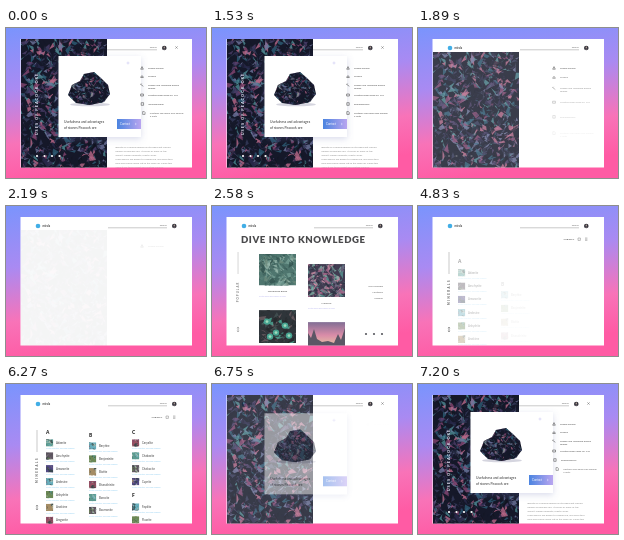
An HTML page that plays this animation: 200x150 px, repeating every 7.23 s.

```html
<!DOCTYPE html>
<html lang="en">
<head>
<meta charset="utf-8">
<title>Mineral library</title>
<style>
  html, body { margin: 0; width: 100%; height: 100%; overflow: hidden; }
  #stage { display: block; width: 100%; height: 100%; font-family: Lato, sans-serif; }
</style>
</head>
<body>
<svg id="stage" viewBox="0 0 200 150">
  <defs>
    <linearGradient id="backdrop" x1="0" y1="0" x2=".2" y2="1">
      <stop offset="0" stop-color="#7a94fd"/>
      <stop offset=".4" stop-color="#a98af2"/>
      <stop offset=".75" stop-color="#f873b8"/>
      <stop offset="1" stop-color="#ff5ba4"/>
    </linearGradient>
    <linearGradient id="action">
      <stop offset="0" stop-color="#4b84e0"/>
      <stop offset="1" stop-color="#b9a5f0"/>
    </linearGradient>
    <linearGradient id="sky" x1="0" y1="0" x2="0" y2="1">
      <stop offset="0" stop-color="#604878"/>
      <stop offset=".5" stop-color="#cf6d91"/>
      <stop offset="1" stop-color="#e3c38a"/>
    </linearGradient>
    <clipPath id="page"><rect x="14.5" y="11" width="171.5" height="128.5"/></clipPath>
    <clipPath id="rock"><path d="M62 67L66 57 74 53 78 46 88 44 96 51 102 57 104 66 98 74 84 77 70 75Z"/></clipPath>
    <filter id="soft" x="-20%" y="-20%" width="140%" height="140%">
      <feDropShadow dx="0" dy="2" stdDeviation="3" flood-color="#6673b0" flood-opacity=".25"/>
    </filter>
  </defs>
  <rect width="200" height="150" fill="url(#backdrop)"/>
  <rect x="14.5" y="11" width="171.5" height="128.5" fill="#fff"/>
  <g id="parts" clip-path="url(#page)"></g>
</svg>
<script>
const LOOP = 7230;
const parts = [];
const root = document.getElementById('parts');

const seg = (t, a, b) => Math.min(1, Math.max(0, (t - a) / (b - a)));
const inOut = p => p * p * (3 - 2 * p);
const out = p => 1 - (1 - p) ** 3;
const show = (t, a, b, c, d) => inOut(seg(t, a, b)) * (1 - inOut(seg(t, c, d)));

// pose(t) gives opacity o and offsets x, y
function part(markup, pose) {
  const node = document.createElementNS('http://www.w3.org/2000/svg', 'g');
  node.innerHTML = markup;
  root.append(node);
  parts.push({ node, pose });
  return node;
}

const text = (x, y, size, str, fill = '#555', extra = '') =>
  `<text x="${x}" y="${y}" font-size="${size}" fill="${fill}" ${extra}>${str}</text>`;
const dot = (x, y, r, fill) => `<circle cx="${x}" cy="${y}" r="${r}" fill="${fill}"/>`;
const line = (x1, y1, x2, y2, color = '#888', width = .5) =>
  `<path d="M${x1} ${y1}L${x2} ${y2}" stroke="${color}" stroke-width="${width}"/>`;
const upright = (x, y, size, str, fill, gap) =>
  text(0, 0, size, str, fill,
    `transform="translate(${x} ${y}) rotate(-90)" text-anchor="middle" font-weight="700" letter-spacing="${gap}"`);

function random(seed) {
  return () => (seed = (seed * 16807) % 2147483647) / 2147483647;
}

function shards(x, y, w, h, colors, count, size, seed) {
  const rnd = random(seed * 7919 + 13);
  const off = () => ((rnd() - .5) * 2 * size).toFixed(1);
  let s = `<rect x="${x}" y="${y}" width="${w}" height="${h}" fill="${colors[0]}"/>`;
  for (let i = 0; i < count; i++) {
    const px = (x + rnd() * w).toFixed(1), py = (y + rnd() * h).toFixed(1);
    const color = colors[Math.floor(rnd() * colors.length)];
    s += `<path d="M${px} ${py}l${off()} ${off()} ${off()} ${off()} ${off()} ${off()}z" fill="${color}" opacity=".8"/>`;
  }
  return s;
}

const photo = (x, y, w, h, ...look) =>
  `<svg x="${x}" y="${y}" width="${w}" height="${h}" overflow="hidden">${shards(0, 0, w, h, ...look)}</svg>`;

const ORE = ['#151829', '#11131f', '#29284a', '#1c2036', '#4a3d68', '#83446f', '#2c5c75',
  '#4b8991', '#353a5a', '#b96889', '#15182a', '#6d739c'];
const FERN = ['#4f766f', '#759e94', '#33534f', '#98b7ac', '#40655f', '#6c8a7c'];
const OPAL = ['#403b50', '#a9688c', '#569391', '#2b3241', '#d08ea6', '#6d6681', '#7fb0a5'];
const REEF = ['#22282d', '#15191d', '#3a4648', '#42a28f', '#66545a', '#1f2428'];

// Header
part(dot(32, 20, 2.3, '#42aee6') + text(36.5, 21, 2.8, 'mirala', '#444', 'font-weight="700"'), () => ({}));
const aside = t => inOut(seg(t, 6350, 6750)) * (1 - inOut(seg(t, 8760, 9060)));
part(line(102, 21.8, 161, 21.8, '#777', .4) +
  text(161, 20.4, 2.5, 'Search', '#666', 'text-anchor="end"') + dot(168.3, 20, 2.3, '#35343c') +
  dot(168.3, 19.3, .8, '#b9a49b') + '<path d="M166.8 21.6q1.5-2 3 0z" fill="#8b8187"/>',
  t => ({ x: -10 * aside(t) }));
part(line(169.3, 18.3, 171.7, 20.7, '#666') + line(171.7, 18.3, 169.3, 20.7, '#666'), t => ({ o: aside(t) }));

// Gallery
part(text(29, 36.8, 9.6, 'DIVE INTO KNOWLEDGE', '#4a4a4c', 'font-weight="900" letter-spacing=".6"'),
  t => ({ o: show(t, 2280, 2540, 4400, 4780), x: -8 * (1 - out(seg(t, 2280, 2640))) }));

const cards = [
  [47, 48, 31, 'Tourquoise green', photo(47, 48, 37, 31.5, FERN, 190, 5, 3)],
  [96, 58, 33, 'Minerals', photo(96, 58, 37, 33, OPAL, 230, 4, 8)],
  [47, 103.5, 33, '', photo(47, 103.5, 37, 33, REEF, 120, 5, 5) +
    [[55, 115], [64, 126], [73, 119], [77, 129], [58, 130]].map(([x, y]) =>
      dot(x, y, 3.2, '#3b9e8a') + dot(x, y, 1.4, '#9ad8b7')).join('')],
  [96, 114, 26, '', '<rect x="96" y="114" width="37" height="26" fill="url(#sky)"/>' +
    '<path d="M96 140V125l3 5 3-9 3 10 5 3 6-1 6 2 4-9 3 6 4-12v20z" fill="#30293c"/>']
];
const leaving = [0, 2, 1, 3];
cards.forEach(([x, y, h, name, picture], i) => {
  const caption = name && text(x + 18.5, y + h + 6.8, 2.6, name, '#444', 'text-anchor="middle"') +
    text(x, y + h + 12.4, 1.8, 'Crystal forms and colours of rocks', '#b6b3ee');
  part(picture + caption, t => {
    const p = out(seg(t, 2280 + 60 * i, 2580 + 60 * i));
    const start = 4180 + 100 * leaving[i];
    return { o: p * (1 - inOut(seg(t, start, start + 320))), y: 10 * (1 - p) };
  });
});

const links = (names, y) => names.map((name, i) =>
  text(171, y + i * 6.3, 2.5, name, '#444', 'text-anchor="end"')).join('');
part(links(['Topics', 'ABC books', 'Minerals'], 55.8) + line(167, 74.5, 171, 74.5, '#999', .3),
  t => ({ o: show(t, 2600, 2940, 4400, 4780), y: -4 * (1 - out(seg(t, 2600, 2940))) }));
part(links(['Encyclopedia', 'Locations', 'Popular'], 83.7),
  t => ({ o: show(t, 2330, 2660, 4400, 4780), y: -8 * (1 - out(seg(t, 2450, 2940))) }));
part([154, 162, 170].map(x => dot(x, 128, 1.1, '#55565c')).join(''),
  t => ({ o: show(t, 2330, 2600, 4400, 4780) }));

// Left rail, shared by gallery and index
const railX = t => -22 * (1 - out(seg(t, 2350, 2940)));
part(line(31, 46, 31, 68, '#777', .4) + line(31, 121, 31, 126, '#666', .7) +
  '<path d="M29.8 122.2L31 121l1.2 1.2M29.8 124.8L31 126l1.2-1.2" fill="none" stroke="#666" stroke-width=".4"/>',
  t => ({ o: show(t, 2330, 2700, 6270, 6600), x: railX(t) }));
part(upright(32, 86, 2.8, 'POPULAR', '#555', 1.1),
  t => ({ o: show(t, 2330, 2700, 4400, 4620), x: railX(t) }));
part(upright(32, 86, 2.8, 'MINERALS', '#555', 1.5), t => ({ o: show(t, 4560, 4780, 6270, 6600) }));

// Index
part(text(145.5, 34, 2.6, 'SUBJECT', '#444') +
  '<path d="M160 32h2.4v2.4H160zM167 32h2.4M167 33.2h2.4M167 34.4h2.4" fill="none" stroke="#666" stroke-width=".4"/>',
  t => ({ o: show(t, 4480, 4780, 6270, 6570) }));

const columns = [
  [40, [['A', 49.6, 59, ['Adamite', 'Aeschynite', 'Amazonite', 'Andesine', 'Anhydrite', 'Analcime', 'Aragonite']]]],
  [83, [['B', 52.8, 62, ['Barytine', 'Benjaminite', 'Biotite', 'Bismuthinite', 'Boracite', 'Bournonite']]]],
  [126, [['C', 49.6, 59, ['Caryalite', 'Chabazite', 'Chalcocite', 'Cuprite']],
    ['F', 113, 123, ['Fayalite', 'Fluorite']]]]
];
const TINTS = ['#5d9b90', '#615762', '#524984', '#67aebc', '#6c8855', '#a58d65', '#965063'];
columns.forEach(([x, groups], c) => {
  let row = 0;
  const pose = r => t => {
    const start = 4700 + 100 * c + 3 * r;
    const p = seg(t, start, start + 330);
    return { o: p * (1 - inOut(seg(t, 6270, 6570))), y: 36 * (1 - p) ** 3 };
  };
  groups.forEach(([letter, base, top, names]) => {
    part(text(x, base, 4.8, letter, '#333', 'font-weight="900"'), pose(row));
    names.forEach((name, i) => {
      const y = top + i * 12.9, n = c * 3 + row;
      part(photo(x, y - 3.7, 7.3, 7.3, [TINTS[n % 7], '#344747', TINTS[(n + 3) % 7], '#b3c6b9'], 14, 3, n + 20) +
        text(x + 10, y + .9, 2.8, name, '#444') +
        text(x, y + 6, 1.8, 'Crystal structure, class and hardness', '#8ecdf0'), pose(row++));
    });
  });
});

// Article
const hero = part(photo(15, 11, 86, 129, ORE, 1050, 5, 11),
  t => ({ o: show(t, 6450, 6850, 9000, 9480) }));
part(upright(32.2, 76, 3.9, 'USES OF PEACOCK ORE', '#eef', 1),
  t => ({ o: show(t, 6700, 6990, 8760, 9000) }));
part([31, 38.5, 46, 53.5].map(x => dot(x, 128, 1.1, '#fff')).join(''),
  t => ({ o: show(t, 6700, 6990, 8850, 9250) }));
part('<rect x="52.5" y="28" width="82.5" height="81" fill="#fff" filter="url(#soft)"/>' +
  '<ellipse cx="84" cy="76.5" rx="20" ry="1.8" fill="#d5d5df"/>' +
  `<g clip-path="url(#rock)">${shards(60, 42, 46, 37, [...ORE, '#686b7d', '#92959c', '#515569'], 330, 3, 41)}</g>` +
  text(58, 95.2, 3.4, 'Usefulness and advantages', '#333') + text(58, 101.2, 3.4, 'of stones Peacock ore', '#333') +
  line(120.5, 35, 123.5, 35, '#b5b3ec', .4) + line(122, 33.5, 122, 36.5, '#b5b3ec', .4) +
  '<rect x="111" y="91" width="24" height="10" fill="url(#action)"/>' +
  text(114, 97, 2.9, 'Contact', '#fff') + '<path d="M129 95l1.3 1-1.3 1" fill="none" stroke="#fff" stroke-width=".4"/>',
  t => ({ o: show(t, 6550, 6960, 8760, 9040), y: 8 * (1 - out(seg(t, 6550, 6990))) }));

const facts = [
  [40, 'Solfide mineral'],
  [48.5, 'Curiella'],
  [57, 'Copper and Hardened bronze', 'sample'],
  [67, 'Mediterranean mine no. 170'],
  [76, 'Rhombohedral'],
  [85, 'Contains sub-minor iron mineral', '5 units']
];
const ICONS = ['M-1.3 1.2L0-1.4 1.3 1.2z', 'M-1.3 1q1.3-4 2.6 0z', 'M-1.5-.8L1.3 1.3M-1.4-.4l1-1',
  'M-1.4-1h2.8v2h-2.8z', 'M-1.2-1.3h2.4v2.6h-2.4z', 'M-1.2-1.4h1.7l.7.8v2h-2.4z'];
facts.forEach(([y, first, second = ''], i) => {
  part(`<path transform="translate(136 ${y})" d="${ICONS[i]}" fill="none" stroke="#444" stroke-width=".55"/>` +
    text(142, y + .8, 2.4, first, '#444') + text(142, y + 3.9, 2.4, second, '#444'), t => {
    const p = seg(t, 6750 + 60 * i, 7080 + 60 * i);
    const gone = seg(t, 9100 - 64 * i, 9480 - 64 * i);
    return {
      o: out(p) * (1 - gone),
      x: 20 * (1 - out(p)),
      y: 1.6 * i * i * inOut(seg(t, 8760, 9480))
    };
  });
});

['Bornite is a mineral prized for its iridescent surface', 'known as peacock ore. It occurs in many of the',
  'world’s copper deposits, mostly small.', 'Fresh pieces are brown to copper red, and soon turn',
  'blue and purple when left in the open air. Collectors', 'value it for these bright and shifting colours.']
  .forEach((str, i) => part(text(109.5, 120.2 + i * 4, 2.5, str, '#888'), t => {
    const p = out(seg(t, 6800 + 40 * i, 7180 + 40 * i));
    return { o: p * (1 - inOut(seg(t, 8760, 9020))), y: 4 * (1 - p) };
  }));

const heroFrame = hero.firstElementChild;

function draw(now) {
  const local = now % LOOP;
  // The article spans the loop seam, so its time continues past the end.
  const t = local < 2265 ? local + LOOP : local;
  for (const { node, pose } of parts) {
    const { o = 1, x = 0, y = 0 } = pose(t);
    node.style.display = o < .004 ? 'none' : '';
    node.setAttribute('opacity', o.toFixed(3));
    node.setAttribute('transform', `translate(${x.toFixed(2)} ${y.toFixed(2)})`);
  }
  const top = 24 - 13 * aside(t);
  heroFrame.setAttribute('y', top);
  heroFrame.setAttribute('height', 140 - top);
}

const start = performance.now();
function tick() {
  draw(performance.now() - start);
  requestAnimationFrame(tick);
}
tick();
</script>
</body>
</html>
```
